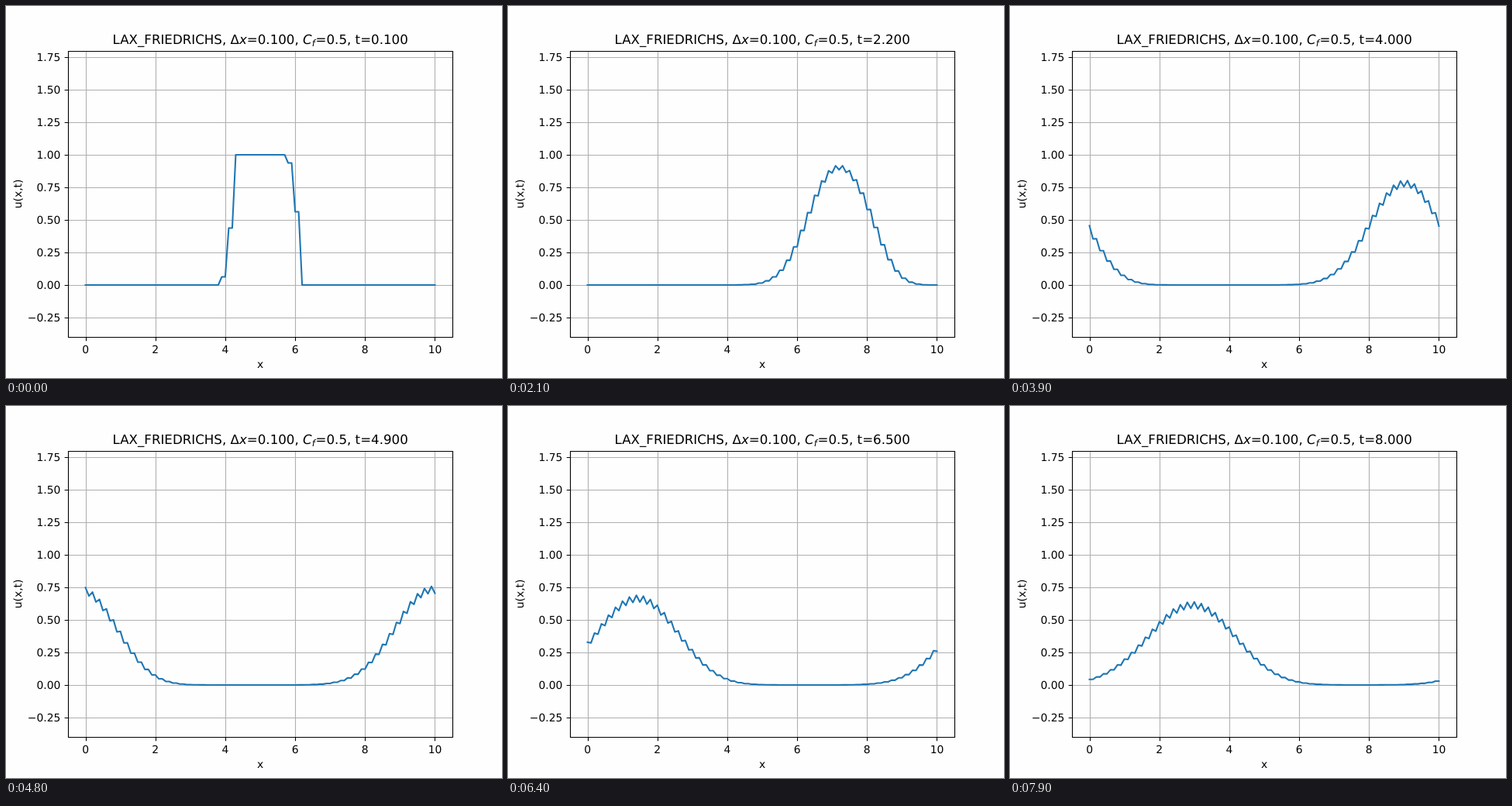
An HTML page that plays this animation: 640 by 480 pixels, repeating every 8 s.

```html
<!DOCTYPE html>
<html lang="en">
<head>
<meta charset="utf-8">
<title>Advection of a square pulse</title>
<style>
  html, body { margin: 0; width: 100%; height: 100%; overflow: hidden; background: #fefefe; }
  svg { display: block; width: 640px; height: 480px; }
  text { font: 13.889px "DejaVu Sans", sans-serif; text-rendering: geometricPrecision; white-space: pre; }
  #title { font-size: 16.667px; }
  .it { font-style: italic; }
  .sub { font-size: 11.667px; }
  .mid { text-anchor: middle; }
  .end { text-anchor: end; }
  path { fill: none; stroke-width: 1.111; }
  #grid { stroke: #b0b0b0; }
  #ticks, #frame { stroke: #000; }
  #curve { stroke: #1f77b4; stroke-width: 2.083; stroke-linecap: square; stroke-linejoin: round; }
</style>
</head>
<body>
<svg viewBox="0 0 640 480">
  <path id="grid"/>
  <path id="ticks"/>
  <path id="curve"/>
  <path id="frame" d="M80.5 58.5H576.5V427.5H80.5Z"/>
  <g id="labels"></g>
  <text class="mid" x="328" y="467">x</text>
  <text class="mid" transform="translate(20 242.4) rotate(-90)">u(x,t)</text>
  <text id="title" x="137.5" y="49">LAX_FRIEDRICHS, Δ<tspan class="it">x</tspan>=0.100, <tspan class="it">C</tspan><tspan class="it sub" dy="3">f</tspan><tspan dx="0.8" dy="-3">=0.5, t=</tspan><tspan id="time">0.100</tspan></text>
</svg>
<script>
const $ = id => document.getElementById(id);
const COUNT = 101, FRAMES = 80, FRAME_MS = 100, STEPS_PER_FRAME = 2, COURANT = 0.5;

const toX = x => 80 + 496 * (x + 0.5) / 11;
const toY = u => 360 - 168 * u;
const snap = v => Math.floor(v + 0.5) + 0.5;

function addLabel(cls, x, y, str) {
  const label = document.createElementNS("http://www.w3.org/2000/svg", "text");
  label.setAttribute("class", cls);
  label.setAttribute("x", x);
  label.setAttribute("y", y);
  label.textContent = str;
  $("labels").append(label);
}

function drawAxes() {
  let grid = "", ticks = "";
  for (let v = 0; v <= 10; v += 2) {
    const x = snap(toX(v));
    grid += `M${x} 58.5V427.5`;
    ticks += `M${x} 427.5v4.86`;
    addLabel("mid", toX(v), 448, v);
  }
  for (let v = -0.25; v <= 1.75; v += 0.25) {
    const y = snap(toY(v));
    grid += `M80.5 ${y}H576.5`;
    ticks += `M80.5 ${y}h-4.86`;
    addLabel("end", 70.3, toY(v) + 5, v.toFixed(2).replace("-", "\u2212"));
  }
  $("grid").setAttribute("d", grid);
  $("ticks").setAttribute("d", ticks);
}

// One Lax-Friedrichs step on a periodic ring
function advance(u) {
  return u.map((_, i) => {
    const left = u[(i + COUNT - 1) % COUNT], right = u[(i + 1) % COUNT];
    return (left + right) / 2 - COURANT / 2 * (right - left);
  });
}

function solve() {
  let u = Array.from({ length: COUNT }, (_, i) => Math.abs(i - 50) < 10 ? 1 : 0);
  return Array.from({ length: FRAMES }, () => {
    for (let s = 0; s < STEPS_PER_FRAME; s++) u = advance(u);
    return "M" + u.map((v, i) => `${toX(i / 10).toFixed(3)} ${toY(v).toFixed(3)}`).join("L");
  });
}

const curves = solve();
let shown = -1;

function show(k) {
  if (k === shown) return;
  shown = k;
  $("curve").setAttribute("d", curves[k]);
  $("time").textContent = ((k + 1) / 10).toFixed(3);
}

drawAxes();
show(0);
const start = performance.now();
function tick() {
  show(Math.floor((performance.now() - start) / FRAME_MS) % FRAMES);
  requestAnimationFrame(tick);
}
requestAnimationFrame(tick);
</script>
</body>
</html>
```
